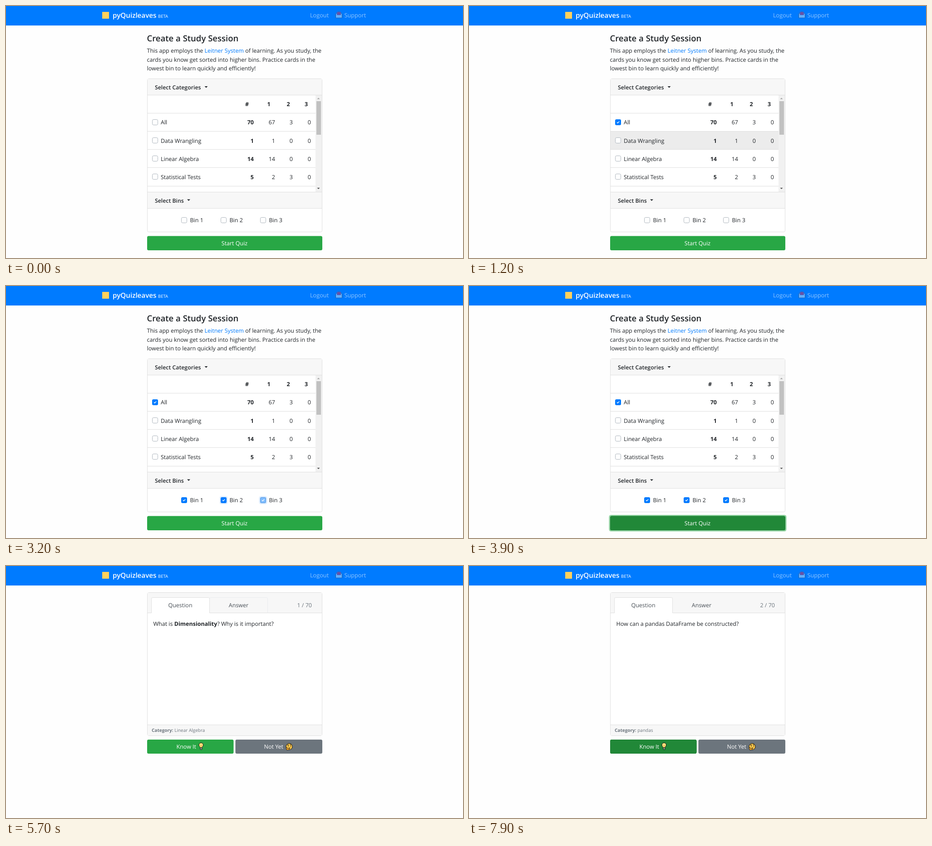
Write an HTML page that moves like this. It is 1007 px wide and 556 px high and loops after 8 s.

```html
<!DOCTYPE html>
<html lang="en">
<head>
<meta charset="utf-8">
<title>Study session</title>
<style>
  html, body { margin: 0; width: 100%; height: 100%; overflow: hidden; background: #fefefe; }
  svg { display: block; width: 1007px; height: 556px; font: 12.5px "Open Sans", "Noto Sans", sans-serif; fill: #212529; text-rendering: geometricPrecision; }
  .b { font-weight: 700; }
  .m { font-weight: 600; }
</style>
</head>
<body>
<svg id="stage" viewBox="0 0 1007 556"></svg>
<script>
const LOOP = 8000, STEP = 100;
const BLUE = '#007bff', GREEN = '#28a745', DARK_GREEN = '#218838', GRAY = '#6c757d', LINE = '#dfdfdf', CAP = '#f7f7f7';
const stage = document.getElementById('stage');

const rect = (x, y, w, h, fill, attrs = '') => `<rect x="${x}" y="${y}" width="${w}" height="${h}" fill="${fill}" ${attrs}/>`;
const path = (d, attrs) => `<path d="${d}" ${attrs}/>`;
const text = (x, y, s, attrs = '') => `<text x="${x}" y="${y}" ${attrs}>${s}</text>`;
const hline = (y, x1 = 311, x2 = 697) => rect(x1, y, x2 - x1, 1, LINE);
const middle = 'text-anchor="middle"', end = 'text-anchor="end"';

// Progress from 0 to 1 in whole steps; the first step shows at `start`.
const ramp = (t, start, steps) => Math.min(1, Math.max(0, (Math.floor((t - start) / STEP) + 1) / steps));

const glow = (x, y, w, h, color, p) =>
  p > 0 ? rect(x - 2.6, y - 2.6, w + 5.2, h + 5.2, color, `rx="5" opacity="${p}"`) : '';

function checkbox(x, y, on, focus = 0) {
  return glow(x, y, 13, 13, '#bfdeff', focus) +
    rect(x + .5, y + .5, 12, 12, '#fff', 'rx="2.8" stroke="#adb5bd"') +
    `<g opacity="${on}">` + rect(x, y, 13, 13, BLUE, 'rx="3.2"') +
    path(`M${x + 4} ${y + 6.5}l1.8 1.8 3.4-3.700`, 'fill="none" stroke="#fff" stroke-width="1.4"') + '</g>';
}

function button(x, y, w, h, color, hover = 0, focus = 0) {
  return glow(x, y, w, h, '#93d3a2', focus) + rect(x, y, w, h, color, 'rx="3.2"') +
    (hover ? rect(x + .5, y + .5, w - 1, h - 1, DARK_GREEN, `rx="2.8" stroke="#1e7e34" opacity="${hover}"`) : '');
}

const envelope = '<g opacity=".6">' +
  path('M726.500 17.500l7-5.500 7 5.500v8.500h-14z', 'fill="#9ccbfa" stroke="#26496f"') +
  rect(729, 13, 9, 7, '#8b4a86') +
  path('M727 18.500l6.500 4.500 6.500-4.500v7h-13z', 'fill="#a8d4ff"') +
  path('M733.500 13v5m-2.500-2l2.500 2.500 2.500-2.500', 'fill="none" stroke="#ca2858" stroke-width="1.500"') + '</g>';

const bulb = path('M428 401c0-2-3-3-3-6a4.800 4.800 0 0 1 9.600 0c0 3-3 4-3 6z', 'fill="#ffe17d" stroke="#111"') +
  rect(428, 401, 4, 4, '#a8a8a8', 'rx="1" stroke="#111"') +
  path('M429.800 401v-5m-1.500-1l1.500 1.500 1.500-1.500', 'fill="none" stroke="#c48a20" stroke-width=".7"');

const thinker = '<circle cx="624" cy="398.500" r="7" fill="#ffc84a" stroke="#111"/>' +
  '<circle cx="622" cy="397" r="1.100"/><circle cx="627.300" cy="397" r="1.100"/>' +
  path('M619.500 395l3.500-1m2.500-.500l3.500.500m-6.500 8l4-.600', 'fill="none" stroke="#111" stroke-width="1.100"') +
  path('M617 401l2-1 1 2.500 4.500-1v2l-2 2.500h-4z', 'fill="#f5a52b" stroke="#111" stroke-width=".8"');

const navbar = rect(0, 0, 1007, 43, BLUE) + rect(212, 13, 15, 15, '#ffd15c') +
  text(235, 26, 'pyQuizleaves', 'class="m" fill="#fff" font-size="15.2"') +
  text(335, 26, 'BETA', 'fill="#fff" font-size="9.5"') +
  `<g fill="#8fc5ff">${text(670, 25, 'Logout', 'font-size="12.7"')}${text(745.5, 25, 'Support', 'font-size="12.7"')}</g>` + envelope;

const intro = text(310.5, 78, 'Create a Study Session', 'class="m" font-size="18.55"') +
  text(310.5, 103, `This app employs the <tspan fill="${BLUE}">Leitner System</tspan> of learning. As you study, the`) +
  text(310.5, 122.5, 'cards you know get sorted into higher bins. Practice cards in the') +
  text(310.5, 142, 'lowest bin to learn quickly and efficiently!');

const rows = [['All', 70, 67, 3, 0], ['Data Wrangling', 1, 1, 0, 0], ['Linear Algebra', 14, 14, 0, 0], ['Statistical Tests', 5, 2, 3, 0]];
const columns = [546, 593, 632, 672];

const scrollbar = rect(682, 197, 14, 213, '#f1f1f1') + rect(684, 210, 10, 74, '#c1c1c1') +
  path('M685.500 205.500h6l-3-3z', 'fill="#a3a3a3"') + path('M685.500 401h6l-3 3z', 'fill="#505050"');

const sectionHead = (y, label, caretX) =>
  text(328, y + 5, label, 'class="m" font-size="12.3"') + path(`M${caretX} ${y - 2}h7l-3.500 3.500z`, '');

function hoveredRow(t) {
  if (t < 500 || t >= 1400) return -1;
  return t < 1200 ? 0 : t < 1300 ? 1 : 3;
}

function setupPage(t) {
  const hover = hoveredRow(t);
  const bins = [ramp(t, 1900, 2), ramp(t, 2700, 3), ramp(t, 3200, 2)];
  const start = ramp(t, 3800, 2);
  let out = intro + rect(311.5, 160.5, 385, 338, '#fff', `rx="3.2" stroke="${LINE}"`) +
    rect(312, 161, 384, 35, CAP) + rect(312, 411, 384, 35, CAP) +
    sectionHead(179, 'Select Categories', 437.5) + sectionHead(428.5, 'Select Bins', 399);
  ['#', 1, 2, 3].forEach((s, i) => out += text([531, 579, 622, 661.5][i], 221, s, `class="b" ${middle}`));
  rows.forEach(([name, ...counts], i) => {
    const y = 236.3 + i * 40.2;
    if (i === hover) out += rect(312, Math.floor(y), 370, 40, '#ececec');
    out += hline(Math.floor(y), 312, 682) + checkbox(322, Math.round(y + 13.5), i ? 0 : ramp(t, 1000, 2)) +
      text(341, y + 25, name);
    counts.forEach((n, c) => out += text(columns[c], y + 25, n, end + (c ? '' : ' class="b"')));
  });
  out += hline(397, 312, 682) + scrollbar + hline(196) + hline(410) + hline(446);
  bins.forEach((on, i) => {
    const x = 386 + i * 87, next = i < 2 ? bins[i + 1] : start;
    out += checkbox(x, 466, on, on - next) + text(x + 19.5, 477, `Bin ${i + 1}`);
  });
  return out + button(311, 507.5, 386, 31.5, GREEN, ramp(t, 3400, 2), start) +
    text(503.5, 528, 'Start Quiz', `${middle} fill="#fff"`);
}

const tab = (x, fill, stroke) => path(`M${x + .5} 103.500v-31a3 3 0 0 1 3-3h122a3 3 0 0 1 3 3v31`, `fill="${fill}" stroke="${stroke}"`);

const firstQuestion = text(324.5, 131.5, 'What is <tspan class="b">Dimensionality</tspan>? Why is it important?');
const secondQuestion = text(324.5, 131.5, 'How can a pandas DataFrame be constructed?');
const answer = text(324.5, 131.5, 'The number of rows and columns a matrix has.') +
  ['Dataframes can be represented as matrix of size =', 'dataframe.shape, and this is important to note if we are',
    'adding new features, concantenating more data, or merging', 'two datasets together.']
    .map((s, i) => text(324.5, 164.5 + i * 19.7, s)).join('');

function quizPage(t) {
  const second = t >= 7600, answered = t >= 6000 && !second;
  const hover = second ? ramp(t, 7900, 1) : ramp(t, 6900, 2);
  const focus = second ? 0 : ramp(t, 7400, 2);
  const activeX = answered ? 448 : 320;
  return rect(311.5, 58.5, 385, 316, '#fff', `rx="3.2" stroke="${LINE}"`) +
    rect(312, 59, 384, 44, CAP) + rect(312, 351, 384, 23, CAP) + hline(350) +
    (t >= 5700 && t < 6000 ? tab(448, 'none', '#e9ecef') : '') +
    hline(103) + tab(activeX, '#fff', LINE) + rect(activeX + 1, 103, 127, 1, '#fff') +
    `<g fill="#495057" ${middle}>${text(384, 91, 'Question')}${text(512.5, 91, 'Answer')}</g>` +
    text(674, 91, `${second ? 2 : 1} / 70`, `${end} fill="${GRAY}"`) +
    (second ? secondQuestion : answered ? answer : firstQuestion) +
    text(321, 366, `<tspan class="b">Category:</tspan> ${second ? 'pandas' : 'Linear Algebra'}`, `font-size="10" fill="${GRAY}"`) +
    button(311, 383, 190.5, 31, GREEN, hover, focus) + button(505.5, 383, 191.5, 31, GRAY) +
    `<g fill="#fff">${text(375.5, 403, 'Know It')}${text(568.5, 403, 'Not Yet')}</g>` + bulb + thinker;
}

let shown = '';
function frame(now) {
  const t = Math.floor(now % LOOP / STEP) * STEP;
  const markup = navbar + (t < 4600 ? setupPage(t) : quizPage(t));
  if (markup !== shown) stage.innerHTML = shown = markup;
  requestAnimationFrame(frame);
}
frame(performance.now());
</script>
</body>
</html>
```
